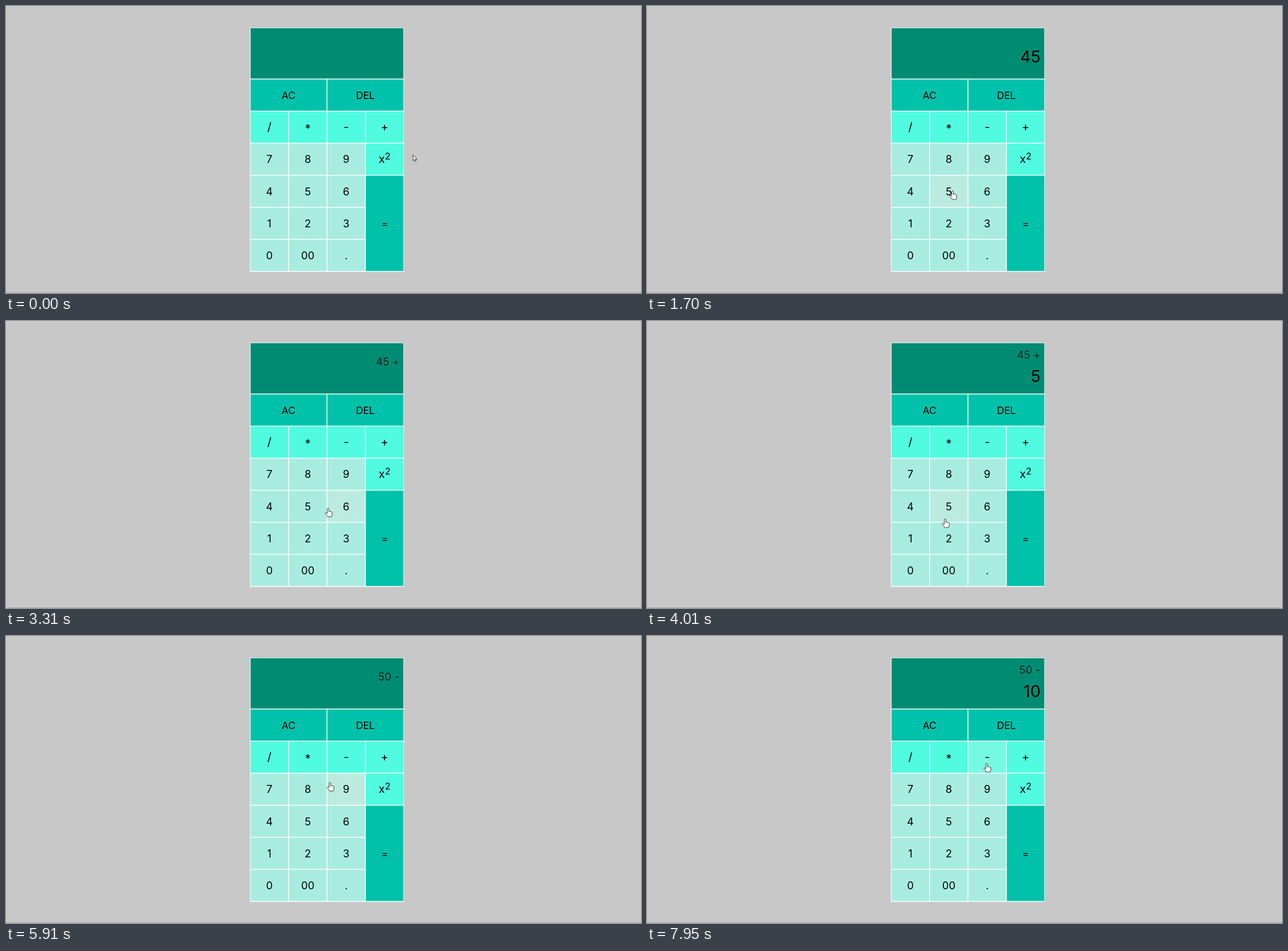
Recreate the animation shown at these times as an HTML page. Size 1114 by 503 pixels, loop 8000 ms.

```html
<!DOCTYPE html>
<html lang="en">
<head>
<meta charset="utf-8">
<title>Calculator</title>
<style>
html, body { margin: 0; width: 100%; height: 100%; overflow: hidden; background: #c8c8c8; }
svg { display: block; }
text { font: 400 18.5px Inter, "Open Sans", sans-serif; text-anchor: middle; }
text.op { font-size: 20px; }
text.main { font-size: 17.5px; }
.end { text-anchor: end; }
#prev { fill-opacity: .75; font-size: 18.8px; }
#cur { font-size: 29px; }
rect.digit { fill: #a8ece0; }
rect.digit.over { fill: #bbebdf; }
rect.op { fill: #50fbe0; }
rect.op.over { fill: #76f9e2; }
rect.main { fill: #00c2aa; }
rect.main.over { fill: #40cbb5; }
#cursor path { fill: #fff; stroke: #222; stroke-width: .9; stroke-linejoin: round; }
</style>
</head>
<body>
<svg width="1114" height="503" viewBox="0 0 1114 503">
  <rect y="502" width="1114" height="1" fill="#a9a9a9"/>
  <rect x="428" y="38" width="270" height="428" fill="#fff"/>
  <rect x="429" y="38.8" width="268.2" height="88.4" fill="#008c73"/>
  <g id="keys"></g>
  <text id="prev" class="end" x="690"></text>
  <text id="cur" class="end" x="690.5"></text>
  <g id="cursor">
    <path id="arrow" d="M0 0V10.2L2.4 8 4 11.6 5.6 10.9 4 7.4H7z"/>
    <path id="hand" d="M-1.4 9.3V1.4a1.4 1.4 0 0 1 2.8 0V6c.6-1.2 2-.9 2.1.3.7-.9 1.9-.5 2 .5.8-.7 1.7-.1 1.7.9V10.4c0 2-.8 2.8-1.3 4.6H-.6C-1.2 13-4 10.8-4.8 9.2-5.2 8-3.9 7.4-3 8z"/>
    <circle id="click" cy="1" r="9" fill="#ff0" opacity=".55"/>
  </g>
</svg>
<script>
const LOOP = 8000, STEP = 67, FLASH = 140;
const LEFT = 428.3, TOP = 128, COL = 67.4, ROW = 56.2, INSET = .7;
const $ = id => document.getElementById(id);
const cells = [];

function add(tag, attrs, html = '') {
  const el = document.createElementNS('http://www.w3.org/2000/svg', tag);
  for (const k in attrs) el.setAttribute(k, attrs[k]);
  el.innerHTML = html;
  $('keys').append(el);
  return el;
}

function addKey(label, kind, col, row, cols = 1, rows = 1) {
  const x = LEFT + col * COL, y = TOP + row * ROW;
  const w = cols * COL, h = rows * ROW;
  const el = add('rect', {
    class: kind, x: x + INSET, y: y + INSET, width: w - 2 * INSET, height: h - 2 * INSET
  });
  cells.push({ el, x, y, w, h });
  add('text', { class: kind, x: x + w / 2, y: y + h / 2 + 6.8 }, label);
}

addKey('AC', 'main', 0, 0, 2);
addKey('DEL', 'main', 2, 0, 2);
['/', '<tspan dy="3">*</tspan>', '-', '+'].forEach((s, i) => addKey(s, 'op', i, 1));
for (let i = 0; i < 9; i++) addKey(String(i + 1), 'digit', i % 3, 4 - Math.floor(i / 3));
['0', '00', '.'].forEach((s, i) => addKey(s, 'digit', i, 5));
addKey('x<tspan dy="-6.5" font-size="0.8em">2</tspan>', 'op', 3, 2);
addKey('=', 'main', 3, 3, 1, 3);

// Cursor stops: leave and arrival time, then place.
const stops = [
  [0, 1, 714, 261],
  [340, 940, 469, 335],
  [1210, 1450, 523, 330],
  [1640, 1970, 645, 275],
  [2040, 2240, 650, 227],
  [3040, 3310, 565, 328],
  [3380, 3800, 523, 347],
  [4340, 4700, 590.5, 221],
  [5840, 6310, 478, 402],
  [6560, 6760, 476, 426],
  [7130, 7680, 596, 223.5]
];
const presses = [[1000, '4'], [1520, '5'], [2300, '+'], [3870, '5'], [5440, '-'], [6390, '1'], [6930, '0']];

const ease = p => p * p * (3 - 2 * p);
const mix = (a, b, p) => a + (b - a) * p;

function cursorAt(t) {
  const i = stops.findLastIndex(s => s[0] <= t);
  const [leave, arrive, x, y] = stops[i];
  const [, , x0, y0] = stops[Math.max(i - 1, 0)];
  const spent = (Math.floor((t - leave) / STEP) + 1) * STEP;
  const p = ease(Math.min(1, spent / (arrive - leave)));
  return [mix(x0, x, p), mix(y0, y, p)];
}

function displayAt(t) {
  let total = 0, op = '', cur = '';
  for (const [at, key] of presses) {
    if (t < at + FLASH / 2) break;
    if (key >= '0') {
      cur += key;
    } else {
      total += op === '-' ? -cur : +cur;
      op = key;
      cur = '';
    }
  }
  return [op && `${total} ${op}`, cur];
}

const show = (id, on) => $(id).setAttribute('visibility', on ? 'visible' : 'hidden');

function draw(t) {
  const [x, y] = cursorAt(t);
  let over = false;
  for (const c of cells) {
    const hit = x >= c.x && x < c.x + c.w && y >= c.y && y < c.y + c.h;
    c.el.classList.toggle('over', hit);
    over = over || hit;
  }
  $('cursor').setAttribute('transform', `translate(${x} ${y})`);
  show('hand', over);
  show('arrow', !over);
  show('click', presses.some(([at]) => t >= at && t < at + FLASH));

  const [prev, cur] = displayAt(t);
  $('prev').textContent = prev;
  $('cur').textContent = cur;
  $('prev').setAttribute('y', cur ? 66.3 : 77.8);
  $('cur').setAttribute('y', prev ? 107 : 99);
}

function tick() {
  draw(performance.now() % LOOP);
  requestAnimationFrame(tick);
}
tick();
</script>
</body>
</html>
```
